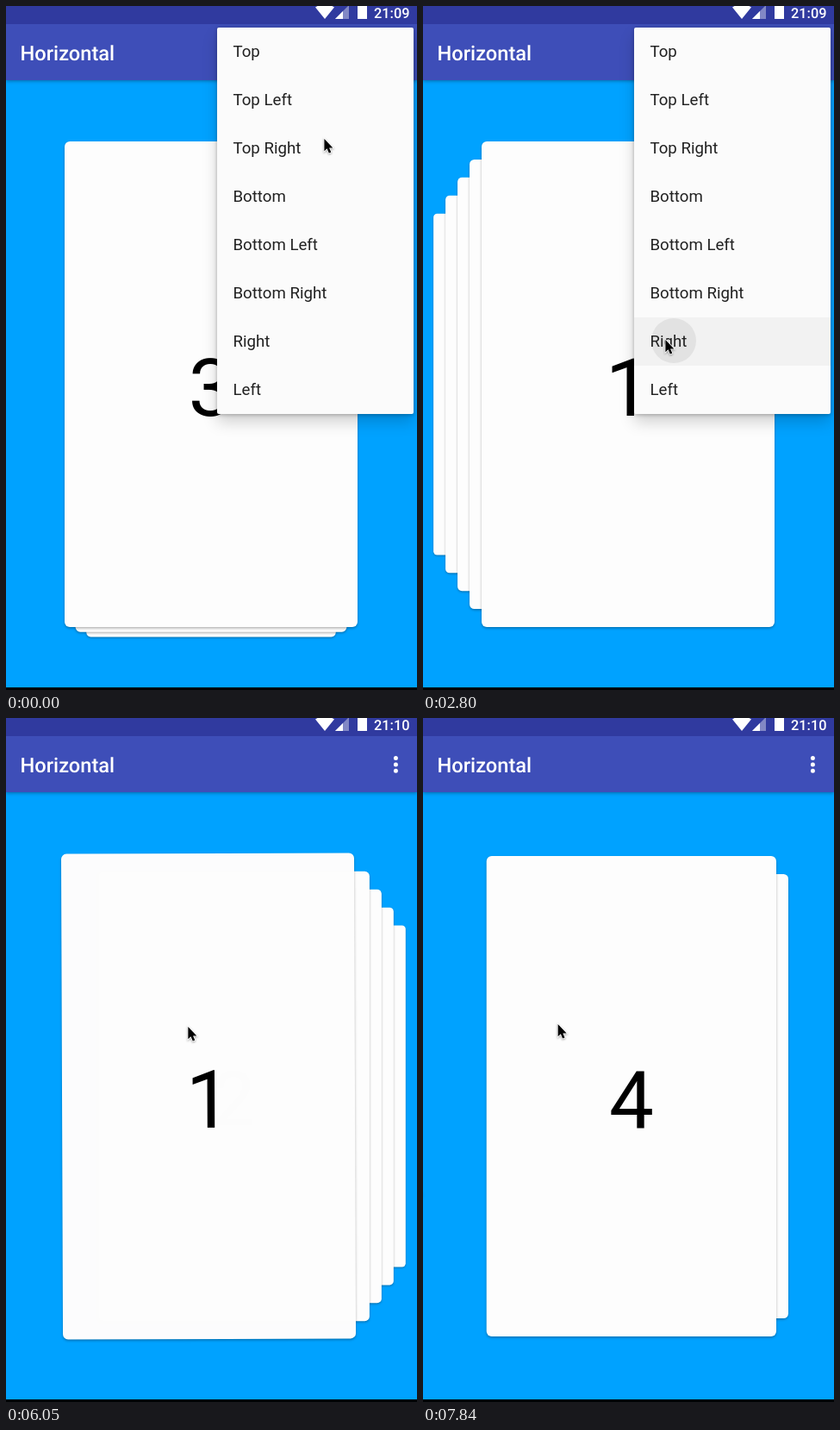
These frames come from a looping animation (477x793 px, 7.99 s). An HTML page:

```html
<!DOCTYPE html>
<html lang="en">
<head>
<meta charset="utf-8">
<title>Card stack</title>
<style>
html, body { margin: 0; width: 100%; height: 100%; overflow: hidden; background: #00a2ff; }
#stage { position: absolute; left: 0; top: 0; width: 477px; height: 793px; overflow: hidden;
  background: #00a2ff; font-family: Roboto, sans-serif; }
#stage > * { position: absolute; }
.status { left: 0; top: 0; width: 477px; height: 21px; background: #303a9f; }
.bar { left: 0; top: 21px; width: 477px; height: 65px; background: #3e4eb8;
  box-shadow: 0 1px 4px rgba(0, 0, 0, .35); }
.foot { left: 0; top: 790px; width: 477px; height: 3px; background: #000; }
.icons { left: 0; top: 0; }
.icons text { fill: #fff; font-weight: 500; text-rendering: geometricPrecision; }
.card { left: 68px; top: 156.5px; width: 340px; height: 563.4px; border-radius: 6px; background: #fdfdfd;
  box-shadow: 0 1.5px 3px rgba(0, 0, 0, .3); }
.card span { position: absolute; left: 0; width: 100%; top: 230px; line-height: 112px;
  text-align: center; font-size: 93.33px; color: #000; }
#menu { left: 245px; top: 25px; width: 228px; height: 448px; border-radius: 2px; background: #fbfbfb;
  box-shadow: 0 10px 17px rgba(0, 0, 0, .17), 0 1px 4px rgba(0, 0, 0, .28); }
.row { position: relative; height: 56px; line-height: 57px; padding-left: 18.5px; overflow: hidden;
  font-size: 18.67px; color: #212121; }
.row.pressed { background: #f2f2f2; }
.row.pressed::before { content: ""; position: absolute; left: calc(var(--x) - 26px); top: 1px;
  width: 52px; height: 52px; border-radius: 50%; background: #e2e2e2; }
.row span { position: relative; }
#cursor { left: 0; top: 0; overflow: visible; filter: drop-shadow(0 1px 1px rgba(0, 0, 0, .35)); }
</style>
</head>
<body>
<div id="stage">
  <div class="bar"></div>
  <div class="status"></div>
  <svg class="icons" width="477" height="90">
    <path d="M370 15 359 1.5Q370-6 381 1.5Z" fill="#fff"/>
    <path d="M382 15H398V-1Z" fill="#fff" opacity=".4"/>
    <path d="M382 15H391V6Z" fill="#fff"/>
    <path d="M408 0H419V15H408Z" fill="#fff"/>
    <text id="clock" x="427" y="13.7" font-size="16.33"></text>
    <text x="16.5" y="63" font-size="23.65">Horizontal</text>
    <path d="M452.4 46.5v0m0 7.4v0m0 7.4v0" stroke="#fff" stroke-width="5" stroke-linecap="round"/>
  </svg>
  <div class="foot"></div>
  <div id="menu"></div>
  <svg id="cursor" width="14" height="20">
    <path d="M.4 0V14.3L3.6 11.2 5.8 16.5 8.3 15.5 6.1 10.4H10.4Z" stroke="#fff" stroke-width="1.6" paint-order="stroke"/>
  </svg>
</div>
<script>
const LOOP = 7990, STEP = 148, LAST_STEP = 53;
const SWIPE_DISTANCE = 636, SWIPE_ANGLE = 45;
const LEVEL_SCALE = 0.0743, LEVEL_SHIFT = 26.6;
const CLOCK_TURN = 31, FIRST_SHOWN = 3;
const DOTS = { x: 453, y: 66 }, GRIP_X = 214, REACH_STEPS = 5, RETURN_STEPS = 2.14;

// All times are counted in steps
const picks = [
  { open: -4, pick: 4, row: "Top Right", stack: [-1, -1], x: 359, y: 158 },
  { open: 10, pick: 19, row: "Right", stack: [-1, 0], x: 281, y: 387 },
  { open: 28, pick: 36, row: "Left", stack: [1, 0], x: 285, y: 446 },
];
const swipes = [
  { from: 40.84, length: 4, x: 138, y: 358 },
  { from: 46.8, length: 2.4, x: 156, y: 376 },
  { from: 49.96, length: 4, x: 138, y: 355 },
];

const $ = id => document.getElementById(id);
const clamp = u => Math.min(1, Math.max(0, u));
const smooth = u => u * u * (3 - 2 * u);

function buildMoves() {
  const moves = [];
  const move = (begin, end, x, y) => moves.push({ begin, end, x, y });
  picks.forEach(({ open, pick, x, y }, i) => {
    move(open + 1, open + 1 + REACH_STEPS, x, y);
    if (i < picks.length - 1) move(pick, pick + RETURN_STEPS, DOTS.x, DOTS.y);
  });
  let free = picks[picks.length - 1].pick + 1;
  for (const { from, length, x, y } of swipes) {
    move(free, from, GRIP_X, y);
    move(from, free = from + length, x, y);
  }
  return moves;
}
const moves = buildMoves();

function cursorAt(step) {
  return moves.reduce((at, { begin, end, x, y }) => {
    const u = clamp((step - begin) / (end - begin));
    return { x: at.x + (x - at.x) * u, y: at.y + (y - at.y) * u };
  }, { x: 384, y: 148 });
}

const labels = ["Top", "Top Left", "Top Right", "Bottom", "Bottom Left", "Bottom Right", "Right", "Left"];
const rows = labels.map(label => {
  const row = document.createElement("div");
  row.className = "row";
  row.innerHTML = `<span>${label}</span>`;
  return $("menu").appendChild(row);
});

const bar = document.querySelector(".bar");
const cards = [1, 2, 3, 4, 5].map(number => {
  const card = document.createElement("div");
  card.className = "card";
  card.innerHTML = `<span>${number}</span>`;
  bar.after(card);
  return card;
});

function drawCards(step) {
  const picked = picks.filter(({ pick }) => pick <= step).pop();
  const [dx, dy] = picked ? picked.stack : [0, 1];
  const swiped = swipes.reduce((sum, { from, length }) => sum + smooth(clamp((step - from) / length)), 0);
  const progress = picked ? swiped : FIRST_SHOWN - 1;
  cards.forEach((card, i) => {
    const level = i - progress, out = Math.max(0, -level), depth = Math.max(0, level);
    const shift = LEVEL_SHIFT * depth;
    card.style.display = out < 1 ? "" : "none";
    card.style.opacity = 1 - out;
    card.style.transform = `translate(${dx * shift - SWIPE_DISTANCE * out}px, ${dy * shift}px)
      rotate(${-SWIPE_ANGLE * out}deg) scale(${1 - LEVEL_SCALE * depth})`;
  });
}

function drawMenu(step, cursor) {
  const shown = picks.map(({ open, pick }) => clamp(Math.min(step - open + 1, pick + 2 - step) / 2));
  $("menu").style.opacity = Math.max(...shown);
  const pressed = picks.find(({ pick }) => step === pick || step === pick + 1);
  rows.forEach((row, i) => {
    row.classList.toggle("pressed", !!pressed && pressed.row === labels[i]);
    if (pressed) row.style.setProperty("--x", `${pressed.x + 10 - 245}px`);
  });
}

function draw(step) {
  const { x, y } = cursorAt(step);
  drawCards(step);
  drawMenu(step);
  $("cursor").style.transform = `translate(${x}px, ${y}px)`;
  $("clock").textContent = step < CLOCK_TURN ? "21:09" : "21:10";
}

const start = performance.now();
let shown = -1;
function tick() {
  const time = (performance.now() - start) % LOOP;
  const step = Math.min(LAST_STEP, Math.floor((time + 20) / STEP));
  if (step !== shown) draw(shown = step);
  requestAnimationFrame(tick);
}
tick();
</script>
</body>
</html>
```
